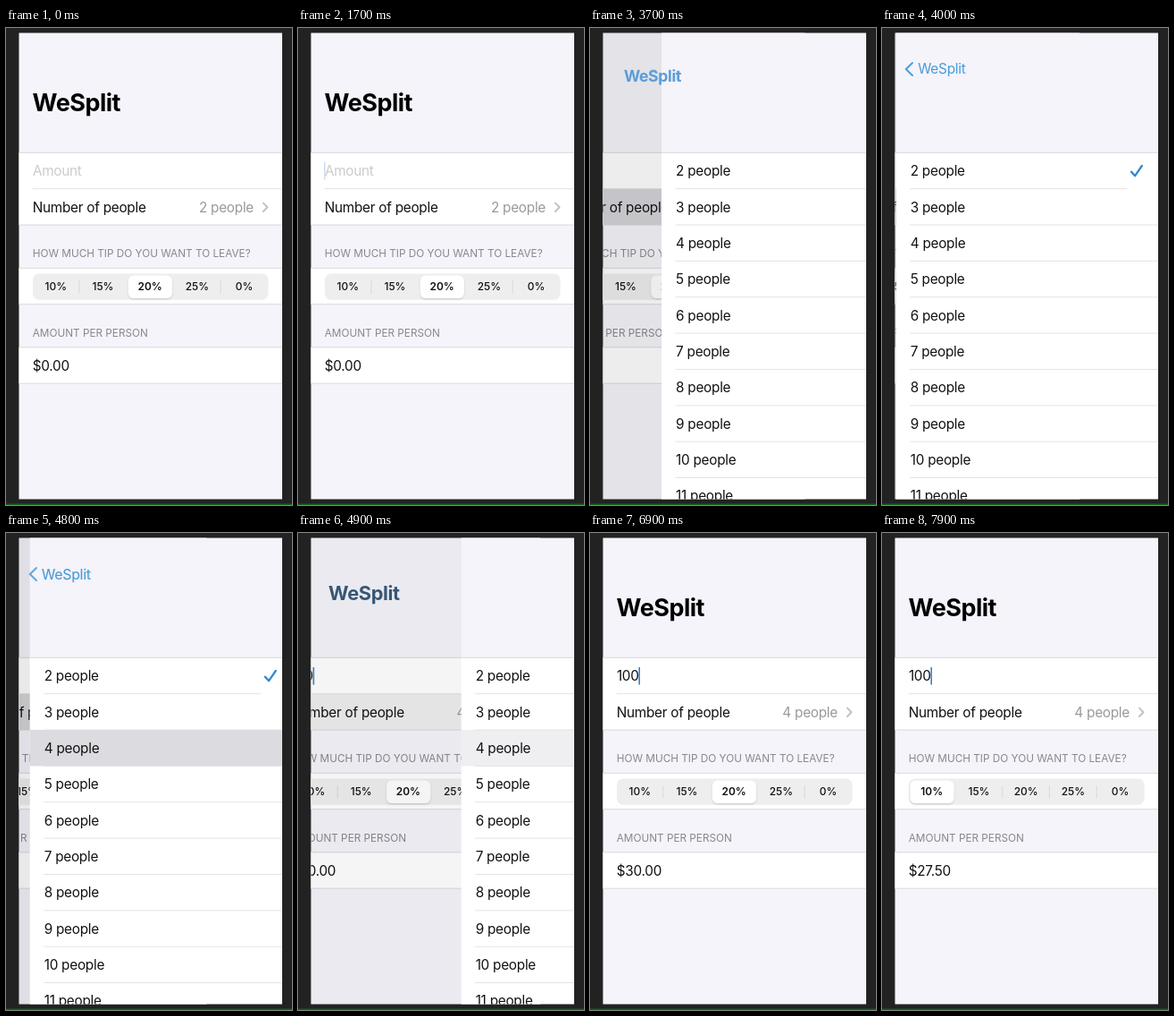
An HTML page that plays this animation: 320 px wide and 533 px high, repeating every 8 s.

```html
<!DOCTYPE html>
<html lang="en">
<head>
<meta charset="utf-8">
<title>Bill splitter</title>
<style>
  html, body { margin: 0; width: 100%; height: 100%; overflow: hidden; background: #222; }
  svg { display: block; width: 100vw; height: 100vh; }
  text { font: 15.3px Inter, "Liberation Sans", sans-serif; letter-spacing: -.25px; fill: #111; }
  .head { font-size: 11.75px; letter-spacing: 0; fill: #87878c; }
  .gray { fill: #98989d; }
  .hint { fill: #cbcbce; }
  .seg { font-size: 11.9px; font-weight: 500; letter-spacing: 0; text-anchor: middle; }
  .seg.on { font-weight: 600; }
  .big { font-size: 27px; font-weight: 700; letter-spacing: -.5px; fill: #000; }
  .back { fill: #4a9bd9; }
  .page { fill: #f4f4fa; }
  .cell { fill: #fff; }
  .line { stroke: #d9d9dd; stroke-width: 1; }
  .thin { stroke: #e3e3e7; }
  .stroke { fill: none; stroke-width: 2; stroke-linecap: round; stroke-linejoin: round; }
</style>
</head>
<body>
<svg viewBox="0 0 320 533">
  <defs>
    <clipPath id="screen"><rect x="14.5" y="5.4" width="294.5" height="521"/></clipPath>
    <filter id="shadow" x="-20%" y="-30%" width="140%" height="170%">
      <feDropShadow dx="0" dy="1.2" stdDeviation="1.3" flood-color="#000" flood-opacity=".16"/>
    </filter>
  </defs>
  <rect width="320" height="533" fill="#222"/>
  <rect y="531.5" width="320" height="1.5" fill="#0b6412"/>

  <g clip-path="url(#screen)">
    <g id="form">
      <rect class="page" x="14" y="5" width="295" height="522"/>
      <g id="cells"></g>
      <rect id="rowTap" x="14" y="179.7" width="295" height="40.4" fill="#d4d4d8"/>
      <text id="amount" x="29.9" y="165"></text>
      <rect id="caret" y="150" width="1.6" height="19.5" fill="#3d7fc8"/>
      <text x="29.7" y="205.5">Number of people</text>
      <text id="people" class="gray" x="277" y="205.5" text-anchor="end"></text>
      <path class="stroke" stroke="#c3c3c7" d="M287.9 195.6l4.6 4.7l-4.6 4.7"/>
      <text class="head" x="29.7" y="256.4">HOW MUCH TIP DO YOU WANT TO LEAVE?</text>
      <rect x="30" y="274.5" width="263.5" height="29.3" rx="7" fill="#eeeeef"/>
      <g id="dividers"></g>
      <rect id="pill" y="276.4" width="49" height="25.6" rx="6" fill="#fff" filter="url(#shadow)"/>
      <g id="tips"></g>
      <text class="head" x="29.7" y="345.2">AMOUNT PER PERSON</text>
      <text id="share" x="29.7" y="382.5"></text>
    </g>
    <rect id="dim" x="14" y="5" width="295" height="522"/>

    <g id="picker">
      <rect class="page" x="14.5" y="5" width="294.5" height="135"/>
      <rect class="cell" x="14.5" y="139.3" width="294.5" height="388"/>
      <rect id="pickTap" x="14.5" y="220" width="294.5" height="40.4" fill="#dadadf"/>
      <path class="line" d="M14.5 139.3H309"/>
      <g id="choices"></g>
      <path class="stroke" stroke="#3588cc" style="stroke-width:2.3" d="M277.7 160.6l4.2 4.6l7.7-11.2"/>
    </g>

    <path id="chevron" class="stroke" stroke="#4fa0dc" style="stroke-width:2.1" d="M34 39l-7.2 7l7.2 7"/>
    <text id="bigTitle" class="big">WeSplit</text>
    <text id="backTitle" class="back">WeSplit</text>
  </g>
</svg>
<script>
  const LOOP = 8000, STEP = 100;
  const WIDTH = 294, ROW = 40.36, TOP = 139.3, SEG = 52.7;
  const PUSH = 3522, POP = 4780, SLIDE = 7050;
  const TIPS = [10, 15, 20, 25, 0];
  const BLINKS = [[1700, 2100], [2900, 3200], [5500, 5800], [6500, 6800], [7500, 7800]];
  const SHRINK = 54 / 98;

  const $ = id => document.getElementById(id);
  const clamp = v => Math.max(0, Math.min(1, v));
  const lerp = (a, b, p) => a + (b - a) * p;

  function add(parent, tag, attrs, label) {
    const el = document.createElementNS("http://www.w3.org/2000/svg", tag);
    for (const k in attrs) el.setAttribute(k, attrs[k]);
    if (label) el.textContent = label;
    return $(parent).appendChild(el);
  }
  const set = (id, name, value) => $(id).setAttribute(name, value);
  const hLine = (parent, x1, x2, y, cls) =>
    add(parent, "path", { class: cls, d: `M${x1} ${y}H${x2}` });

  // Static parts
  for (const [y, rows] of [[TOP, 2], [268.3, 1], [356.8, 1]]) {
    add("cells", "rect", { class: "cell", x: 14, y, width: 295, height: ROW * rows });
    hLine("cells", 14, 309, y, "line");
    hLine("cells", 14, 309, y + ROW * rows, "line");
  }
  hLine("cells", 29.7, 309, TOP + ROW, "line thin");

  const segX = i => 30 + SEG * i;
  const dividers = [1, 2, 3, 4].map(i =>
    add("dividers", "path", { class: "line", d: `M${segX(i) - .7} 282v14.5` }));
  const tips = TIPS.map((tip, i) =>
    add("tips", "text", { class: "seg", x: segX(i) + SEG / 2 - .6, y: 293.3 }, tip + "%"));

  for (let i = 0; i < 10; i++) {
    const y = TOP + ROW * i;
    add("choices", "text", { x: 30.5, y: y + 25.9 }, `${i + 2} people`);
    hLine("choices", 30, i ? 309 : 273, y + ROW, "line thin");
  }

  // Critically damped spring from 0 to 1
  function spring(ms, k = 16) {
    const u = Math.max(0, ms) * k / 1000;
    return 1 - (1 + u) * Math.exp(-u);
  }

  function caretAlpha(t) {
    if (t < 1200) return 0;
    let a = 1;
    for (const [off, on] of BLINKS)
      a = Math.min(a, Math.max(clamp((off + 33 - t) / 133), clamp((t - on + 100) / 200)));
    return t >= 2000 && t < 2400 ? 1 : a;
  }

  function drawForm(t, p) {
    const typed = t < 2000 ? "" : t < 2100 ? "1" : t < 2300 ? "10" : "100";
    const people = t < 4700 ? 2 : 4;
    const tip = t < SLIDE ? 2 : 0;
    const pos = 2 * (1 - spring(t - SLIDE, 20));

    $("amount").textContent = typed || "Amount";
    set("amount", "class", typed ? "" : "hint");
    set("caret", "x", [29, 36.5, 45.5, 54.4][typed.length]);
    set("caret", "opacity", caretAlpha(t));
    $("people").textContent = people + " people";
    $("share").textContent = "$" + (typed * (1 + TIPS[tip] / 100) / people).toFixed(2);

    set("pill", "x", segX(pos) + 1.5);
    tips.forEach((el, i) => el.setAttribute("class", i === tip ? "seg on" : "seg"));
    dividers.forEach((el, i) =>
      el.setAttribute("opacity", clamp(Math.abs(i + .5 - pos) * 2 - 1)));

    set("rowTap", "opacity", t < 3500 ? 0 : t < POP ? 1 : p);
    set("form", "transform", `translate(${-.3 * WIDTH * p} 0)`);
    set("dim", "opacity", .09 * p);
  }

  function drawTitle(p) {
    const scale = lerp(1, SHRINK, p);
    const at = s => `translate(${lerp(29.5, 40.3, p)} ${lerp(93.3, 50.4, p)}) scale(${s})`;
    const tint = clamp((p - .1) / .6);
    set("bigTitle", "transform", at(scale));
    set("bigTitle", "opacity", clamp((1 - p) / .22));
    $("bigTitle").style.fill =
      `rgb(${lerp(0, 98, tint)}, ${lerp(0, 158, tint)}, ${lerp(0, 216, tint)})`;
    set("backTitle", "transform", at(scale / SHRINK));
    set("backTitle", "opacity", clamp((p - .7) / .25));
    set("chevron", "opacity", clamp((p - .78) / .2));
  }

  function draw(t) {
    const p = t < POP ? spring(t - PUSH) : 1 - spring(t - POP);
    drawForm(t, p);
    drawTitle(p);
    set("picker", "transform", `translate(${WIDTH * (1 - p)} 0)`);
    set("picker", "visibility", p > .001 ? "visible" : "hidden");
    set("pickTap", "opacity", t < 4600 ? 0 : t < POP ? 1 : p);
  }

  const start = performance.now();
  function tick() {
    const t = (performance.now() - start) % LOOP;
    draw(Math.floor(t / STEP) * STEP);
    requestAnimationFrame(tick);
  }
  tick();
</script>
</body>
</html>
```
